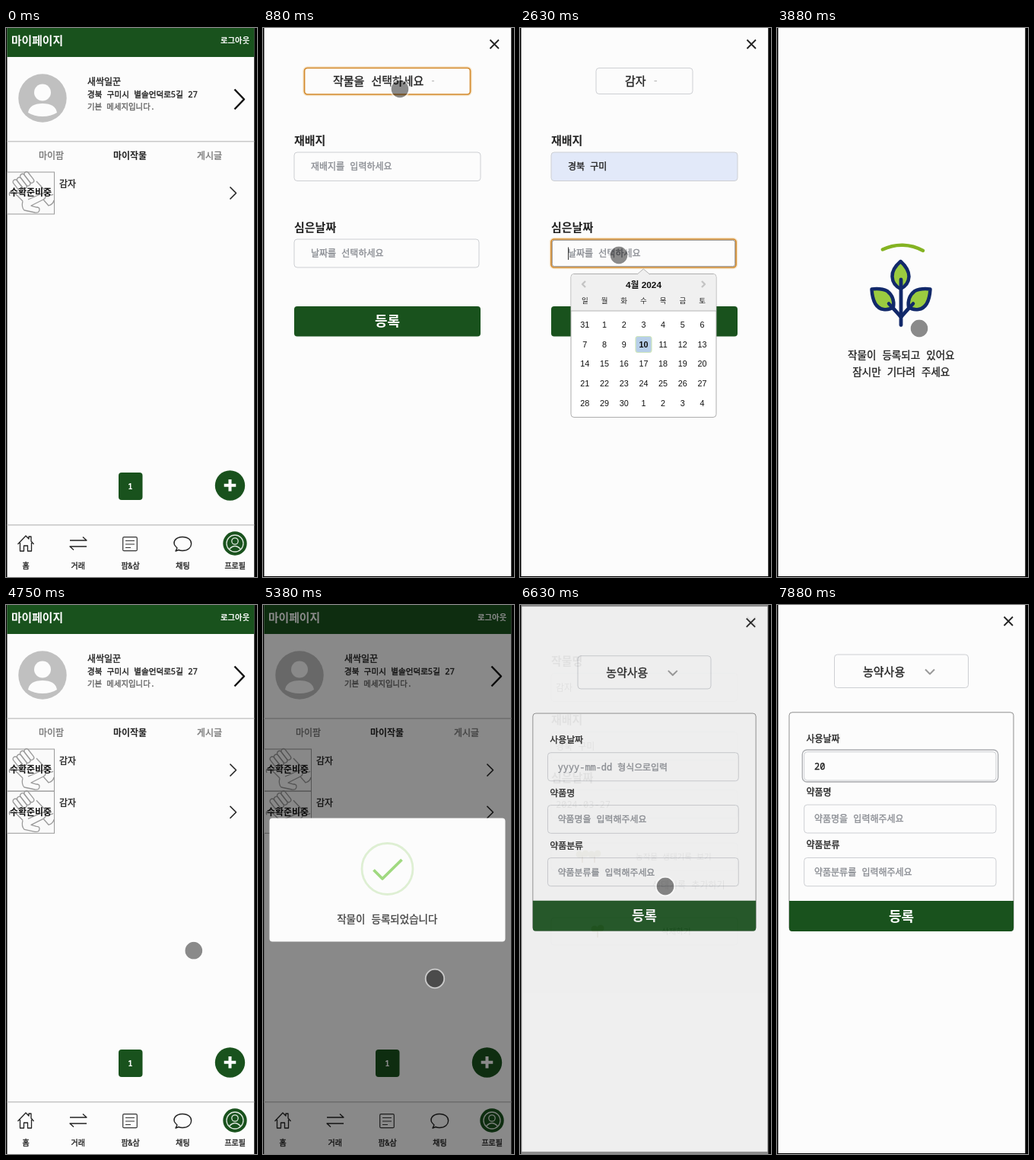
Recreate the animation shown at these times as an HTML page. Size 330x720 px, loop 8 s.

```html
<!DOCTYPE html>
<html lang="ko">
<head>
<meta charset="utf-8">
<style>
html, body { margin: 0; width: 100%; height: 100%; overflow: hidden; background: #000; }
svg { display: block; width: 330px; height: 720px; }
text { font-family: "Noto Sans Mono", "Noto Sans CJK KR", monospace; white-space: pre; }
.cal text { font-family: "Liberation Sans", "Noto Sans CJK KR", sans-serif; }
</style>
</head>
<body>
<svg id="stage" viewBox="0 0 330 720"></svg>
<script>
const LOOP = 8000, STEP = 125;
const GREEN = '#19521d', PAPER = '#fcfcfc', INK = '#222', HINT = '#8b8e94', EDGE = '#cdcfd3';
const stage = document.getElementById('stage');

const clamp = v => Math.max(0, Math.min(1, v));
const easeOut = v => 1 - (1 - clamp(v)) ** 2;

// Text is placed by the vertical middle of its glyphs; weight 500 gets a hairline outline.
function text(x, cy, str, size, fill = INK, weight = 400, anchor = 'start') {
  const outline = weight === 500 ? `stroke="${fill}" stroke-width="0.35"` : '';
  return `<text x="${x}" y="${cy + size * 0.37}" font-size="${size}" fill="${fill}" font-weight="${weight}" text-anchor="${anchor}" ${outline}>${str}</text>`;
}
const mid = (x, cy, str, size, fill, weight) => text(x, cy, str, size, fill, weight, 'middle');

function box(x, y, x2, y2, r = 0, fill = 'none', stroke = 'none', width = 1) {
  return `<rect x="${x}" y="${y}" width="${x2 - x}" height="${y2 - y}" rx="${r}" fill="${fill}" stroke="${stroke}" stroke-width="${width}"/>`;
}
function line(d, stroke, width = 1, fill = 'none', extra = '') {
  return `<path d="${d}" fill="${fill}" stroke="${stroke}" stroke-width="${width}" stroke-linejoin="round" ${extra}/>`;
}
function disc(x, y, r, fill, stroke = 'none', width = 1) {
  return `<circle cx="${x}" cy="${y}" r="${r}" fill="${fill}" stroke="${stroke}" stroke-width="${width}"/>`;
}
const group = (body, attrs) => `<g ${attrs}>${body}</g>`;
const paper = (bottom = 719) => box(1.5, 0, 326.3, bottom, 0, PAPER);
const shade = a => `<rect x="1.5" width="325" height="720" opacity="${a}"/>`;
const closeMark = () => line('M298.5 15.5L310 27M310 15.5L298.5 27', INK, 1.8);
const submit = (x, y, x2, y2, r) => box(x, y, x2, y2, r, GREEN) + mid(163.5, (y + y2) / 2, '등록', 18, '#fff', 700);

function focusRing(x, y, x2, y2) {
  return box(x - 1, y - 1, x2 + 1, y2 + 1, 5, 'none', '#f5e3c6', 2.5) + box(x, y, x2, y2, 4, PAPER, '#d3892b', 1.7);
}
function field(x, y, x2, y2, str, fill = HINT, back = PAPER) {
  return box(x, y, x2, y2, 4, back, EDGE) + text(x < 40 ? 49 : 63, (y + y2) / 2, str, 12, fill, 500);
}

// Two tilted hands: fingers above, a pointing finger below.
function hand() {
  const fingers = [0, 1, 2, 3].map(i => box(12 + 6 * i, 2 + i % 2, 18 + 6 * i, 20, 3, 'none', '#9a9a9a', 1.3)).join('');
  return group(fingers, 'transform="rotate(-38 24 16)"')
    + line('M6 24L20 38M3 31Q1 27 5 25M38 12L52 27Q57 32 60 29M20 38Q18 46 22 50L36 53Q42 54 42 49Q42 46 38 46L31 44L47 36Q52 33 49 29Q47 27 43 29L27 36M47 36L54 44Q60 42 61 37', '#9a9a9a', 1.3);
}
function cropRow(y) {
  return box(1.5, y, 63.5, y + 55, 0, '#fafafa', '#9a9a9a')
    + group(hand(), `transform="translate(2 ${y})"`)
    + mid(32.5, y + 27, '수확준비중', 12, '#111', 900)
    + text(70, y + 15.5, '감자', 12, INK, 500)
    + line(`M294.5 ${y + 19.5}L302.5 ${y + 27.5}L294.5 ${y + 35.5}`, INK, 1.6);
}
function nav() {
  const labels = ['홈', '거래', '팜&amp;삼', '채팅', '프로필'];
  return box(1.5, 651, 326.3, 652.5, 0, '#c6c6c6')
    + line('M15.5 677L26 666L30 670V667H33V673L36.5 677M18.5 675V686H23.5V679H28.5V686H33.5V675', INK, 1.3)
    + line('M84 672H106L101 667.5M106 680H84L89 684.5', INK, 1.3)
    + box(153.7, 667.7, 172.3, 685.7, 1.5, 'none', '#333', 1.2)
    + line('M157 672.5H169M157 677H169M157 681.5H164', '#333', 1.1)
    + line('M223 686L225 682C216 674 224 667.5 232 667.5C248 667.5 247 685.5 232 685.5Q229 685.5 227 684.5Z', INK, 1.4)
    + disc(301, 676, 15.7, GREEN) + disc(301, 676, 11, 'none', '#dfe8df', 1.3)
    + disc(301, 673, 4.2, 'none', '#dfe8df', 1.3) + line('M293.5 683.5Q301 675.5 308.5 683.5', '#dfe8df', 1.3)
    + labels.map((s, i) => mid(26 + 68.8 * i, 705, s, 10, INK, 500)).join('');
}
function home(rows) {
  let s = paper(720) + box(1.5, 0, 326.3, 38, 0, GREEN)
    + text(7, 16.5, '마이페이지', 14.8, '#fff', 700) + text(282, 16, '로그아웃', 10.4, '#fff', 700)
    + disc(48, 92, 31.7, '#c0c0c0') + disc(48, 84.5, 11, PAPER)
    + line('M29 111Q31 99 48 99Q65 99 67 111Q59 116 48 116Q37 116 29 111Z', 'none', 0, PAPER)
    + text(107, 70.5, '새싹일꾼', 12, INK, 500)
    + text(107, 87.5, '경북 구미시 별솔언덕로5길 27', 10.57, INK, 500)
    + text(107, 103.5, '기본 메세지입니다.', 10.4, '#666', 500)
    + line('M300.5 80.5L313 93.5L300.5 106.5', '#111', 2.5)
    + box(1.5, 148, 326.3, 149.5, 0, '#cacaca')
    + mid(59.5, 168, '마이팜', 12, '#777', 500) + mid(163, 168, '마이작물', 12, INK, 700) + mid(267.5, 168, '게시글', 12, '#777', 500);
  for (let i = 0; i < rows; i++) s += cropRow(189 + 55.3 * i);
  return s + box(148, 583, 179.5, 619, 4, GREEN) + mid(163.5, 601, '1', 10.5, '#fff', 700)
    + disc(294.5, 600, 19.7, GREEN) + line('M294.5 592V607.6M286.7 599.8H302.3', '#fff', 4) + nav();
}

function calendar() {
  const col = i => 85.3 + 25.7 * i, row = r => 389 + 25.7 * r;
  let s = box(67, 322.5, 258, 510.5, 4, '#fff', '#adadad')
    + line('M67.5 371V326Q67.5 323 71 323H254Q257.5 323 257.5 326V371Z', 'none', 0, '#f0f0f0')
    + line('M67 371H258', '#b4b4b4') + line('M154 323L162.3 316L170.5 323', '#b4b4b4', 1, '#f0f0f0')
    + mid(162.5, 337, '4월 2024', 11.8, '#111', 700)
    + line('M86 332L82 336L86 340M239 332L243 336L239 340', '#c4c4c4', 2.4)
    + [...'일월화수목금토'].map((d, i) => mid(col(i), 357, d, 9.5, INK)).join('')
    + box(152, 404.5, 173, 425.5, 3, '#b7cfe9', '#cfe6bd', 1.2);
  for (let n = 0; n < 35; n++) {
    const day = n === 0 ? 31 : n > 30 ? n - 30 : n;
    s += mid(col(n % 7), row(Math.floor(n / 7)), day, 10.8, '#111', n === 10 ? 700 : 400);
  }
  return group(s, 'class="cal"');
}

function cropForm(t) {
  const picked = t >= 1375, filled = t >= 2000, dated = t >= 3000;
  const typing = t >= 1625 && t < 2375, dating = t >= 2375 && t < 3125;
  let s = paper() + closeMark();
  if (!picked) {
    s += t >= 750 ? focusRing(54.5, 52.5, 272.5, 87) : box(54.5, 52.5, 272.5, 87, 4, PAPER, EDGE);
    s += text(92, 69, '작물을 선택하세요', 15, INK, 500) + line('M222 69.5H225', '#bbb', 1.2);
  } else {
    s += box(100, 52.5, 227, 86.5, 4, PAPER, EDGE) + text(138, 69, '감자', 15, INK, 500) + line('M176.5 69.5H180', '#bbb', 1.2);
  }
  s += text(41, 147, '재배지', 15, INK, 700) + text(41, 261, '심은날짜', 15, INK, 700);
  s += filled ? field(41, 163, 286, 200.5, '경북 구미', INK, '#e2e9f9') : field(41, 163, 286, 200.5, '재배지를 입력하세요');
  if (typing) s += box(41, 163, 286, 200.5, 4, 'none', '#d3892b', 1.7);
  if (dating) s += focusRing(41, 277, 284, 314) + box(42.3, 278.3, 282.7, 312.7, 3, 'none', '#777', 0.8);
  else s += box(41, 277, 284, 314, 4, PAPER, EDGE);
  s += text(63, 296, dated ? '2024-04-10' : '날짜를 선택하세요', 12, dated ? INK : HINT, 500);
  if (dating && !dated) s += line('M63.5 287.5V304', '#333');
  s += submit(41, 365, 286, 404.5, 4);
  return s + (dating && !dated ? calendar() : '');
}

function loader(t) {
  const navy = '#12296a', leaf = '#9bcb40', round = 'stroke-linecap="round"';
  const turn = (t - 3875) / 1000 * 360;
  const side = line('M163 379L148.5 362.5', navy, 4.5, 'none', round)
    + line('M124.5 342.5Q126 367 140 369Q148 370 153 366Q155 353 145 345Q137 341 124.5 342.5Z', navy, 4.5, leaf)
    + line('M163 379L147 361.5', navy, 4.5, 'none', round);
  return paper()
    + line('M138.8 290.5A57 57 0 0 1 192 292', '#84b322', 4.5, 'none', `${round} transform="rotate(${turn} 163 341)"`)
    + side + group(side, 'transform="translate(326 0) scale(-1 1)"')
    + line('M162.5 306Q151 316 151.5 326Q152 337 162.5 342Q173 337 173.5 326Q173.5 316 162.5 306Z', navy, 4.5, leaf)
    + line('M163 330V389.5', navy, 4.8, 'none', round)
    + mid(163.3, 429, '작물이 등록되고 있어요', 13.5, INK, 500)
    + mid(163.3, 451, '잠시만 기다려 주세요', 13.5, INK, 500);
}

function popup(t) {
  const q = t >= 5500 ? 0.5 : easeOut((t - 4750) / 375);
  const k = 0.8 + 0.2 * q, tick = clamp((t - 4875) / 375);
  const s = box(8.5, 279.5, 318.5, 441.5, 4, PAPER)
    + disc(163.5, 346, 33.5, 'none', '#deefd3', 2.8)
    + line('M145.5 347.5L157 359L182.5 334', '#a0d980', 3.8, 'none', `pathLength="1" stroke-dasharray="${tick} 2"`)
    + mid(163.3, 412, '작물이 등록되었습니다', 13.5, '#444', 500);
  return shade(0.46 * q) + group(s, `opacity="${q}" transform="translate(163.5 360) scale(${k}) translate(-163.5 -360)"`);
}

function detail() {
  const sprout = (x, y) => line(`M${x} ${y + 8}V${y - 2}`, '#7a5a2c', 2)
    + disc(x - 4, y - 3, 4.5, '#9a9a5a') + disc(x + 4, y - 4, 4.5, '#9a9a5a');
  const rows = [['작물명', '감자', 73], ['재배지', '경북 구미', 150], ['심은날짜', '2024-03-27', 226]];
  return paper(720) + closeMark()
    + rows.map(([k, v, y]) => text(41, y, k, 15, INK, 700)
      + box(41, y + 16.5, 286, y + 53.5, 4, PAPER, EDGE) + text(47, y + 35.5, v, 12)).join('')
    + box(41, 312, 286, 348, 4, PAPER, EDGE) + sprout(82, 330) + sprout(98, 330)
    + text(152, 330, '농작물 생태기록 보기', 10.5)
    + text(174, 368, '생태기록 추가하기', 12)
    + box(41, 410, 286, 446, 4, PAPER, EDGE) + sprout(102, 428) + text(186, 428, '삭제하기', 10.5);
}

function sprayForm(t) {
  const typed = t >= 7875 ? '20' : t >= 7750 ? '2' : '';
  return paper() + closeMark()
    + box(75.5, 65, 251.5, 108.5, 4, PAPER, EDGE) + text(113, 87, '농약사용', 15, INK, 500)
    + line('M195 84.5L201 90.5L207 84.5', '#999', 2)
    + box(16, 140.8, 311, 427.5, 4, PAPER, '#8f8f8f')
    + text(38.5, 176, '사용날짜', 12, INK, 500) + text(38.5, 245.5, '약품명', 12, INK, 500) + text(38.5, 315, '약품분류', 12, INK, 500)
    + (t >= 7125 ? box(33.3, 190, 290.7, 232, 6, PAPER, '#aaacb0', 1.3) : '')
    + field(35.7, 192.7, 288, 230, typed || 'yyyy-mm-dd 형식으로입력', typed ? INK : HINT)
    + field(35.7, 262, 288, 299, '약품명을 입력해주세요')
    + field(35.7, 331.5, 288, 368.7, '약품분류를 입력해주세요')
    + line('M16 388H311V424Q311 428 307 428H20Q16 428 16 424Z', 'none', 0, GREEN)
    + mid(163.5, 408, '등록', 18, '#fff', 700);
}

// Fades and grows a full page over a dimmed one.
function overlay(under, over, p) {
  if (p >= 1) return over;
  const k = 0.95 + 0.05 * p;
  return under + shade(0.5 * p)
    + group(over, `opacity="${p}" transform="translate(163.5 360) scale(${k}) translate(-163.5 -360)"`);
}

const path = [
  [125, 294, 600], [250, 294, 600], [625, 215, 130], [875, 180, 80], [1125, 180, 80],
  [1625, 150, 182], [1875, 150, 182], [2500, 130, 298], [2625, 130, 298], [2875, 162, 414],
  [3000, 162, 414], [3250, 187, 394], [3875, 187, 394], [4375, 252, 444], [4625, 252, 444],
  [5250, 226, 490], [5500, 226, 490], [5750, 240, 271], [5875, 240, 271], [6125, 191, 369],
  [6625, 191, 369], [7000, 110, 212], [7375, 110, 212]
];
function pointer(t) {
  const i = path.findIndex(p => p[0] > t);
  if (i < 1 || (t > 250 && t < 625)) return '';
  const [a, b] = [path[i - 1], path[i]], u = (t - a[0]) / (b[0] - a[0]);
  const x = a[1] + (b[1] - a[1]) * u, y = a[2] + (b[2] - a[2]) * u;
  return disc(x, y, 11.4, 'rgba(0,0,0,.45)') + disc(x, y, 12.3, 'none', 'rgba(255,255,255,.55)', 1.8);
}

function scene(t) {
  if (t < 250) return home(1);
  if (t < 3375) return overlay(home(1), cropForm(t), easeOut((t - 250) / 380));
  if (t < 4625) return loader(t);
  if (t < 5875) return home(2) + (t >= 4875 && t < 5625 ? popup(t) : '');
  if (t < 6375) return detail();
  return overlay(detail(), sprayForm(t), easeOut((t - 6375) / 380));
}

let last = -1;
function tick(now) {
  const t = Math.floor(now % LOOP / STEP) * STEP;
  if (t !== last) {
    stage.innerHTML = '<rect width="330" height="720"/>' + scene(t) + pointer(t);
    last = t;
  }
  requestAnimationFrame(tick);
}
tick(0);
</script>
</body>
</html>
```
